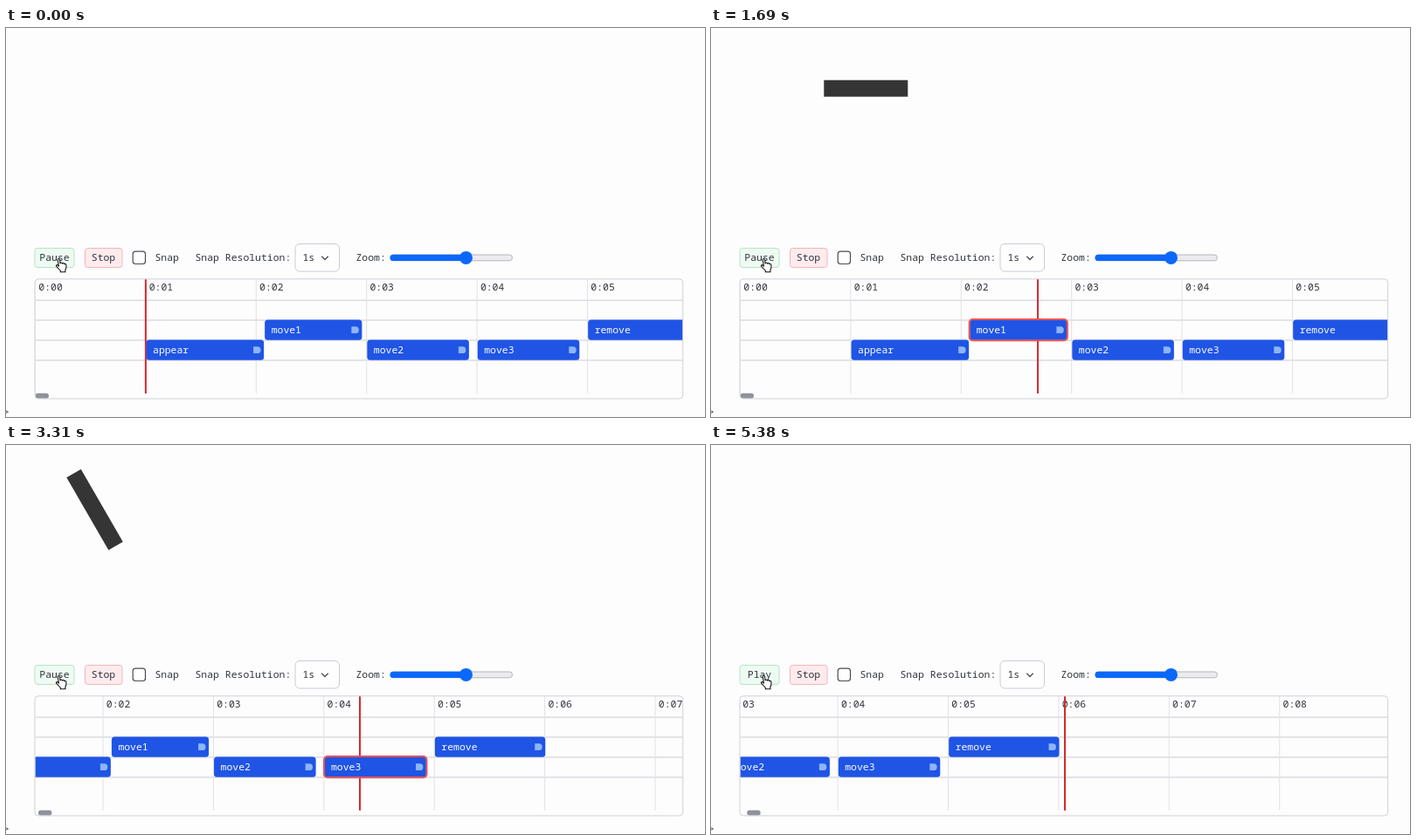
Recreate the animation shown at these times as an HTML page. Size 800x446 px, loop 5440 ms.

```html
<!DOCTYPE html>
<html lang="en">
<head>
<meta charset="utf-8">
<title>Timeline player</title>
<style>
  html, body { margin: 0; width: 100%; height: 100%; overflow: hidden; background: #fdfdfe; }
  svg { display: block; width: 100vw; height: 100vh; }
  text { font: 11.45px "Noto Sans Mono", "DejaVu Sans Mono", monospace; fill: #30343b; white-space: pre; }
  .clip text { fill: #fff; }
  .clip .body { fill: #1f54e5; }
  .clip .grip { fill: #8db5f8; }
  .clip .ring { fill: none; stroke: #ef5252; stroke-width: 2; }
  .row { stroke: #dcdde0; stroke-width: 1.6; }
  .tick { stroke: #e1e2e7; }
</style>
</head>
<body>
<svg viewBox="0 0 800 446">
  <defs>
    <clipPath id="panelClip"><rect x="33.5" y="288" width="741" height="137" rx="4"/></clipPath>
  </defs>

  <rect id="actor" x="-48" y="-9.5" width="96" height="19" fill="#353535"/>

  <rect x="33" y="252.5" width="45" height="22" rx="3" fill="#eefbf2" stroke="#b7e4c4"/>
  <text id="toggle" x="55.5" y="267" text-anchor="middle">Pause</text>
  <rect x="90.5" y="252.5" width="42.5" height="22" rx="3" fill="#ffebed" stroke="#f4b4ba"/>
  <text x="111.5" y="267" text-anchor="middle">Stop</text>
  <rect x="145.2" y="256.2" width="14.3" height="14.3" rx="3" fill="#fff" stroke="#4a4d54" stroke-width="1.2"/>
  <text x="170.5" y="267">Snap</text>
  <text x="216.5" y="267">Snap Resolution:</text>
  <rect x="331" y="247.5" width="50.5" height="31.5" rx="5" fill="#fefefe" stroke="#c9ccd3"/>
  <text x="339.5" y="267">1s</text>
  <path d="M361.3 261.8l3.7 3.7 3.7-3.7" fill="none" stroke="#4a4d54" stroke-width="1.3"/>
  <text x="400.5" y="267">Zoom:</text>
  <rect x="440" y="260" width="139.5" height="6.8" rx="3.4" fill="#ececee" stroke="#b4b5b9"/>
  <rect x="439.5" y="259.8" width="88" height="7.2" rx="3.6" fill="#0b68fb"/>
  <circle cx="526.5" cy="263.4" r="7.5" fill="#0b68fb"/>
  <text x="-3" y="443.5">&gt;</text>

  <g clip-path="url(#panelClip)">
    <path class="row" d="M33 312.3H775M33 335H775M33 358H775M33 381H775"/>
    <g id="ruler"></g>
    <path id="playhead" d="M0 288V419" stroke="#d42b30" stroke-width="2"/>
    <g id="clips"></g>
    <rect id="thumb" x="33.5" y="418.7" width="15.5" height="6" rx="3" fill="#8f929a"/>
  </g>
  <rect x="33" y="287.8" width="741.7" height="137.2" rx="4" fill="none" stroke="#cfd1d6"/>

  <path transform="translate(57 264)" fill="#fff" stroke="#111" stroke-width="1.1" stroke-linejoin="round"
    d="M2.2 1.5C2.2.1 4.3.1 4.5 1.5L5.1 6C5.4 4.6 7.3 4.8 7.5 6.2C8 5.1 9.6 5.4 9.8 6.8C10.5 6 11.8 6.5 11.9 7.7C12.2 10.3 12 11.6 10.9 13.4V15.7H5.3V14.2C3.6 12.7 2.4 10.8 .8 9.4C-.2 8.2 1 7.2 2.2 8L3.4 9.1Z"/>
</svg>

<script>
const LOOP = 5440, STEP = 62.5;
const LEFT = 33.5, SECOND = 126.4, MIDDLE = 405;
const END = 6.056, STAGE_LAG = 0.03;
const HOME = { x: 137, y: 109.5 }, UNIT = 47.3;

// Each clip carries the actor from the preceding pose to its own `to` pose.
const hidden = { x: 0, y: 0, turn: -180, alpha: 0 };
const clips = [
  { name: "appear", start: 1.005, length: 1.065, row: 1, to: { x: 0, y: 0, turn: 0, alpha: 1 } },
  { name: "move1", start: 2.078, length: 0.88, row: 0, to: { x: 1, y: -1, turn: 0, alpha: 1 } },
  { name: "move2", start: 3.005, length: 0.922, row: 1, to: { x: -1, y: -1, turn: 60, alpha: 1 } },
  { name: "move3", start: 4.005, length: 0.922, row: 1, to: { x: 1, y: 1, turn: 60, alpha: 1 } },
  { name: "remove", start: 5.005, length: 1, row: 0, to: hidden }
];

const $ = id => document.getElementById(id);

function add(parent, tag, attrs, content = "") {
  const node = document.createElementNS("http://www.w3.org/2000/svg", tag);
  for (const key in attrs) node.setAttribute(key, attrs[key]);
  node.textContent = content;
  return parent.appendChild(node);
}

const move = (node, x) => node.setAttribute("transform", `translate(${x.toFixed(2)} 0)`);
const clamp = v => Math.min(1, Math.max(0, v));
const ease = p => p < 0.5 ? 4 * p ** 3 : 1 - 4 * (1 - p) ** 3;
const xOf = seconds => LEFT + seconds * SECOND;

for (let s = 0; s < 10; s++) {
  const x = xOf(s);
  add($("ruler"), "path", { class: "tick", d: `M${x} 288V419` });
  add($("ruler"), "text", { x: x + 3.8, y: 300.5 }, `0:0${s}`);
}

for (const clip of clips) {
  const x = xOf(clip.start), y = 334.5 + clip.row * 23, width = clip.length * SECOND;
  const group = add($("clips"), "g", { class: "clip" });
  add(group, "rect", { class: "body", x, y, width, height: 23.3, rx: 3.5 });
  clip.ring = add(group, "rect", { class: "ring", x: x - 0.5, y: y - 0.5, width: width + 1, height: 24.3, rx: 4 });
  add(group, "text", { x: x + 7.5, y: y + 15.7 }, clip.name);
  add(group, "path", { class: "grip", d: `M${x + width - 12} ${y + 7.8}h4.5a3.9 3.9 0 0 1 0 7.8h-4.5z` });
}

function poseAt(time) {
  const pose = { ...hidden };
  for (const { start, length, to } of clips) {
    const e = ease(clamp((time - start) / length));
    for (const key in pose) pose[key] += (to[key] - pose[key]) * e;
  }
  return pose;
}

function render(ms) {
  const t = Math.floor((ms + 3) / STEP) * STEP / 1000;
  const time = Math.min(END, 1 + t * 1.004);
  const scroll = Math.max(0, xOf(time) - MIDDLE);

  move($("ruler"), -scroll);
  move($("clips"), -scroll);
  move($("playhead"), xOf(time) - scroll);
  move($("thumb"), scroll * 0.0195);
  for (const { ring, start, length } of clips) {
    ring.style.display = time >= start && time < start + length ? "" : "none";
  }

  const pose = poseAt(time - STAGE_LAG);
  $("actor").setAttribute("transform",
    `translate(${HOME.x + pose.x * UNIT} ${HOME.y + pose.y * UNIT}) rotate(${pose.turn})`);
  $("actor").setAttribute("opacity", pose.alpha);
  $("toggle").textContent = t > 5.1 ? "Play" : "Pause";
}

const began = performance.now();
function tick() {
  render((performance.now() - began) % LOOP);
  requestAnimationFrame(tick);
}
tick();
</script>
</body>
</html>
```
